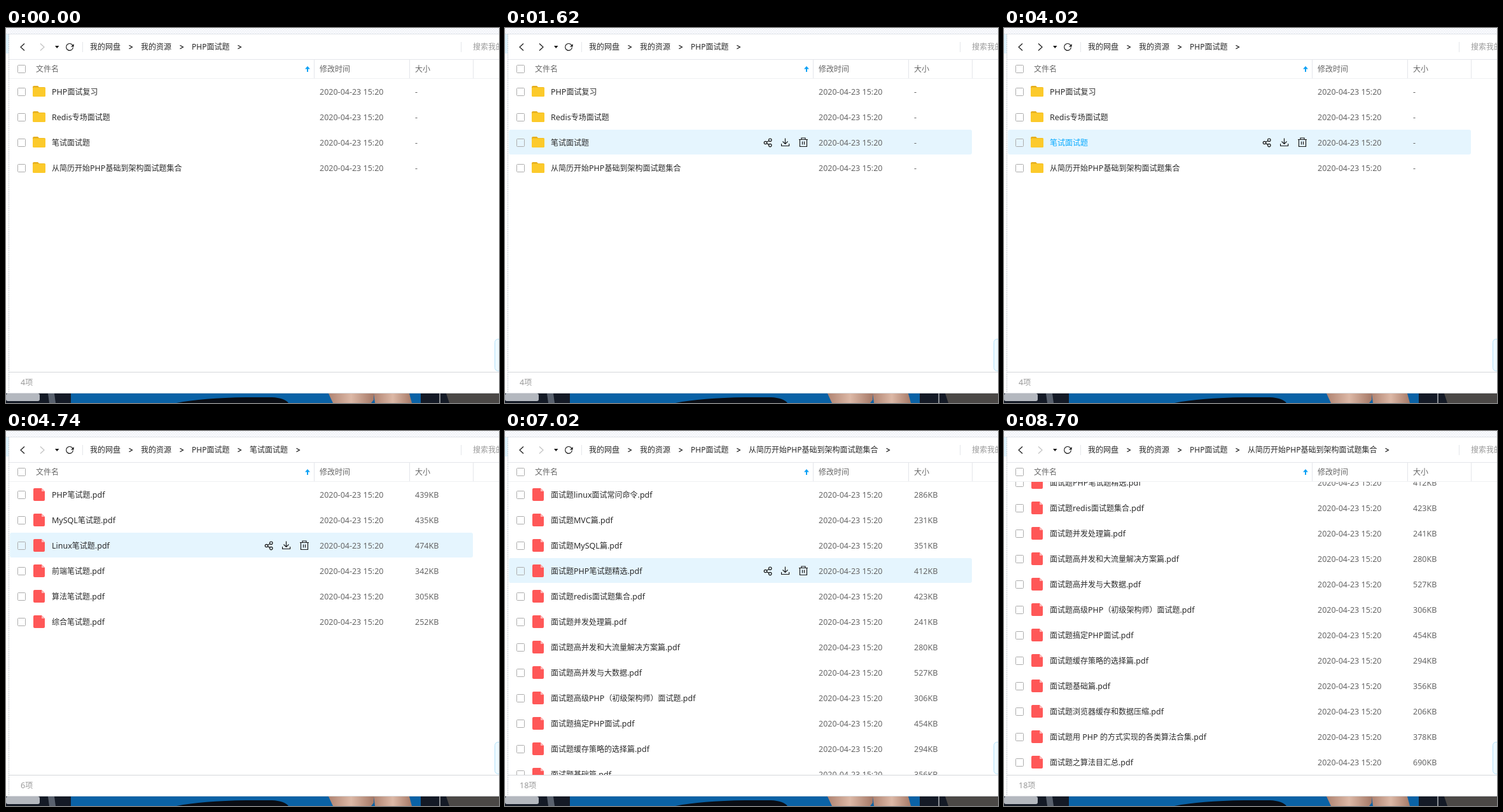
Write an HTML page that moves like this. It is 775 by 590 pixels and loops after 9.36 s.

```html
<!DOCTYPE html>
<html lang="zh-CN">
<head>
<meta charset="utf-8">
<title>面试题文件列表</title>
<style>
html, body { margin: 0; width: 100%; height: 100%; overflow: hidden; background: #fff; }
svg { display: block; }
text { font: 12px "Noto Sans CJK SC", "Noto Sans CJK", "Noto Sans", sans-serif; white-space: pre; fill: #666; }
.latin { font: 12.5px "Noto Sans", "Open Sans", sans-serif; }
#crumbs .latin { font-size: 12px; }
.name { fill: #2b2b2b; }
.over { fill: #09aaff; }
.soft { fill: #999; }
.line { fill: none; stroke: #e4e6ea; }
.icon { fill: none; stroke: #1a1a1a; stroke-width: 1.2; }
.check { fill: none; stroke: #adadad; }
</style>
</head>
<body>
<svg width="775" height="590" viewBox="0 0 775 590">
  <defs>
    <clipPath id="list"><rect x="5" y="80" width="770" height="461"/></clipPath>
    <pattern id="dots" width="4" height="4" patternUnits="userSpaceOnUse">
      <rect width="4" height="4" fill="#f8f9fc"/>
      <path d="M0 0h1v1h-1zM2 2h1v1h-1z" fill="#e3e8f0"/>
    </pattern>
    <linearGradient id="skin">
      <stop offset="0" stop-color="#b08472"/><stop offset=".5" stop-color="#dcb8a6"/><stop offset="1" stop-color="#a67a68"/>
    </linearGradient>
  </defs>

  <rect width="775" height="590" fill="#fff"/>
  <rect width="775" height="9" fill="url(#dots)"/>
  <rect y="9" width="775" height="1" fill="#e2e5ea"/>
  <rect y="10" width="4" height="30" fill="#dff3fe"/>
  <path d="M4.5 10V575" stroke="#c4c9d0" stroke-dasharray="2 1"/>

  <!-- photo strip below the window -->
  <rect y="575" width="775" height="15" fill="#141a26"/>
  <rect y="575" width="53" height="12" rx="3" fill="#b4b8bf"/>
  <path d="M66 575h10l2 15h-10z" fill="#59616e"/>
  <rect x="102" y="575" width="550" height="15" fill="#0a62a6"/>
  <path d="M268 590q40-8 110-9h40q20 1 26 9z" fill="#0a0d14"/>
  <path d="M507 575h71v10l-4 5h-60z" fill="url(#skin)"/>
  <path d="M578 575h56l4 15h-58z" fill="url(#skin)"/>
  <path d="M681 575h2v15h-2z" fill="#8b8f94"/>
  <path d="M692 575h83v15h-78z" fill="#4b4846"/>

  <!-- toolbar -->
  <path class="icon" d="M29 24.5l-6 5.5l6 5.5"/>
  <path id="fwd" class="icon" d="M54 24.5l6 5.5l-6 5.5"/>
  <path d="M77 28h6.5L80.2 32z" fill="#1a1a1a"/>
  <path class="icon" d="M104.6 27A5.4 5.4 0 1 0 105.4 30.5"/>
  <path d="M106.6 25v4.4h-4.6z" fill="#1a1a1a"/>
  <path class="line" d="M120.5 22V38M715.5 22V38"/>
  <text class="soft" x="734" y="34">搜索我的文件</text>
  <g id="crumbs"></g>

  <!-- table head -->
  <path class="line" d="M5 49.5H775M484.5 50V79M634.5 50V79M734.5 50V79"/>
  <path class="line" d="M5 79.5H775" style="stroke:#f0f1f3"/>
  <rect class="check" x="18.5" y="58.5" width="12" height="12" rx="1"/>
  <text x="47" y="69">文件名</text>
  <text x="493" y="69">修改时间</text>
  <text x="643" y="69">大小</text>
  <path d="M470 64.5l4-4.5l4 4.5h-3v4.5h-2v-4.5z" fill="#09a1f5"/>

  <g id="rows" clip-path="url(#list)"></g>

  <rect x="768.5" y="489.5" width="20" height="50" rx="5" fill="#effaff" stroke="#b5e3fa"/>
  <path d="M5 541.5H775" stroke="#d4d7db"/>
  <text id="status" class="soft" x="23" y="562"></text>
  <path d="M0 574.5H775" stroke="#d9dce0"/>
</svg>

<script>
const LOOP = 9360, TICK = 60, ROW = 40, TOP = 80, VIEW = 461;
const $ = id => document.getElementById(id);

// Small seeded generator for plausible file sizes.
let seed = 7;
const randomSize = () => 200 + (seed = seed * 73 % 331) + 'KB';
const series = (topics, suffix) => topics.split(' ').map(s => `${s}${suffix}.pdf|${randomSize()}`);

// Entries are "name|size"; the first folder is the root.
const root = ['PHP面试复习', 'Redis专场面试题', '笔试面试题', '从简历开始PHP基础到架构面试题集合'];
const lists = [
  root,
  series('PHP MySQL Linux 网络协议 面向对象 设计模式 数据结构 算法', '面试复习'),
  ['MongoDB+Redis 面试专题.pdf|252KB', 'Redis 主从架构.pdf|288KB', 'Redis和Memcached的区别.pdf|506KB',
    'Redis快速入门.pdf|266KB', 'redis面试题集合.pdf|482KB', 'Redis面试题精选.pdf|407KB',
    'Redis哨兵集群实现高可用.pdf|289KB', 'Redis实战(中文完整).pdf|60.74MB',
    '如何访问 Redis 中的海量数据？.pdf|201KB'],
  series('PHP MySQL Linux 前端 算法 综合', '笔试题'),
  [...series('Git HTTP Laravel', '篇'),
    'linux面试常问命令.pdf|286KB', 'MVC篇.pdf|231KB', 'MySQL篇.pdf|351KB', 'PHP笔试题精选.pdf|412KB',
    'redis面试题集合.pdf|423KB', '并发处理篇.pdf|241KB', '高并发和大流量解决方案篇.pdf|280KB',
    '高并发与大数据.pdf|527KB', '高级PHP（初级架构师）面试题.pdf|306KB', '搞定PHP面试.pdf|454KB',
    '缓存策略的选择篇.pdf|294KB', '基础篇.pdf|356KB', '浏览器缓存和数据压缩.pdf|206KB',
    '用 PHP 的方式实现的各类算法合集.pdf|378KB', '之算法目汇总.pdf|690KB'].map(s => '面试题' + s)
];

// Folder visits: opened, list loaded, back to the root.
const visits = [
  { dir: 1, open: 600, load: 840, back: 1500 },
  { dir: 2, open: 2340, load: 2460, back: 3480 },
  { dir: 3, open: 4440, load: 4620, back: 5220 },
  { dir: 4, open: 5880, load: 6300, back: LOOP }
];

// Pointer waypoints: time and screen row (none = away).
const pointer = [
  [0], [120, 0], [960, 3], [1560, 2], [1920, 1], [2580, 3], [3720, 2], [5340], [5640, 3],
  [6480, 4], [6660, 3], [7560, 4.3], [8340, 4], [8520, 3], [8700]
];
const onName = t => t >= 4020 && t < 4620;

// Each wheel turn scrolls three rows, one per tick, up to the end of the list.
const wheelTurns = [6900, 7440, 7860];
function scrollAt(t, count) {
  const ticks = wheelTurns.reduce((sum, start) =>
    sum + Math.max(0, Math.min(3, Math.floor((t - start) / TICK) + 1)), 0);
  return Math.min(ticks * ROW, Math.max(0, count * ROW - VIEW));
}

function stateAt(t) {
  const visit = visits.find(v => t >= v.open && t < v.back);
  const open = visit ? visit.dir : 0;
  const listed = visit && t >= visit.load ? open : 0;
  const scroll = scrollAt(t, lists[listed].length);
  const at = pointer.findLast(p => p[0] <= t)[1];
  const hovered = at === undefined ? -1 : Math.floor(at + 0.5 + scroll / ROW);
  return { open, listed, scroll, hovered, over: onName(t), forward: !visit && t > visits[0].open };
}

const mixed = s => s.replace(/[ -~]+/g, m => `<tspan class="latin">${m}</tspan>`);
const text = (x, y, s, cls = '') => `<text x="${x}" y="${y}" class="${cls}">${mixed(s)}</text>`;

const folderIcon =
  '<path d="M42 13q0-2 2-2h6l2 2h8q2 0 2 2v4h-20z" fill="#e5ae1d"/>' +
  '<rect x="42" y="13.5" width="20" height="14.5" rx="1.5" fill="#fcca2b"/>';
const fileIcon =
  '<path d="M45 10h11l5 5v13q0 2-2 2h-14q-2 0-2-2v-16q0-2 2-2z" fill="#ff5757"/>' +
  '<path d="M56 10l5 5h-5z" fill="#ffb3b3"/>';

const tools = `<g class="icon">
  <circle cx="409.5" cy="20.5" r="2.2"/><circle cx="416.8" cy="16.2" r="2.2"/><circle cx="416.8" cy="24.6" r="2.2"/>
  <path d="M411.4 19.4l3.5-2M411.4 21.6l3.5 1.8"/>
  <path d="M440.5 13.5v8.5M436.5 18.5l4 4l4-4M434.6 22v3.5h12v-3.5"/>
  <path d="M462 15.5h14M466 15.5v-2.5h6v2.5M463.5 15.5v11h11v-11M467.5 18.5v5M470.5 18.5v5"/>
</g>`;

function row(entry, i, { scroll, hovered, over }) {
  const [name, size = '-'] = entry.split('|');
  const hover = i === hovered;
  return `<g transform="translate(0 ${TOP + i * ROW - scroll})">
    ${hover ? '<rect x="6" width="728" height="39" rx="3" fill="#e5f5fe"/>' + tools : ''}
    <rect class="check" x="18.5" y="14.5" width="12" height="12" rx="1"/>
    ${size === '-' ? folderIcon : fileIcon}
    ${text(72, 25, name, hover && over ? 'over' : 'name')}
    ${text(493, 25, '2020-04-23 15:20')}${text(643, 25, size)}</g>`;
}

function drawCrumbs(open) {
  const box = $('crumbs');
  const labels = ['我的网盘', '我的资源', 'PHP面试题'];
  if (open) labels.push(root[open - 1]);
  box.innerHTML = labels.map(s => text(0, 34, s, 'name')).join('');
  let x = 132, arrows = '';
  for (const label of box.querySelectorAll('text')) {
    label.setAttribute('x', x);
    x += Math.floor(label.getComputedTextLength());
    arrows += `M${x + 13.5} 27.2l5 2.8l-5 2.8`;
    x += 32;
  }
  box.insertAdjacentHTML('beforeend', `<path class="icon" d="${arrows}"/>`);
}

function draw(state) {
  const { open, listed, forward } = state;
  const files = lists[listed];
  $('fwd').style.stroke = forward ? '#1a1a1a' : '#c2c2c2';
  drawCrumbs(open);
  $('rows').innerHTML = files.map((f, i) => row(f, i, state)).join('');
  $('status').innerHTML = mixed(open === listed ? files.length + '项' : '正在加载..');
}

let shown = '';
function frame() {
  const state = stateAt(performance.now() % LOOP);
  const key = Object.values(state).join();
  if (key !== shown) {
    shown = key;
    draw(state);
  }
  requestAnimationFrame(frame);
}
frame();
</script>
</body>
</html>
```
